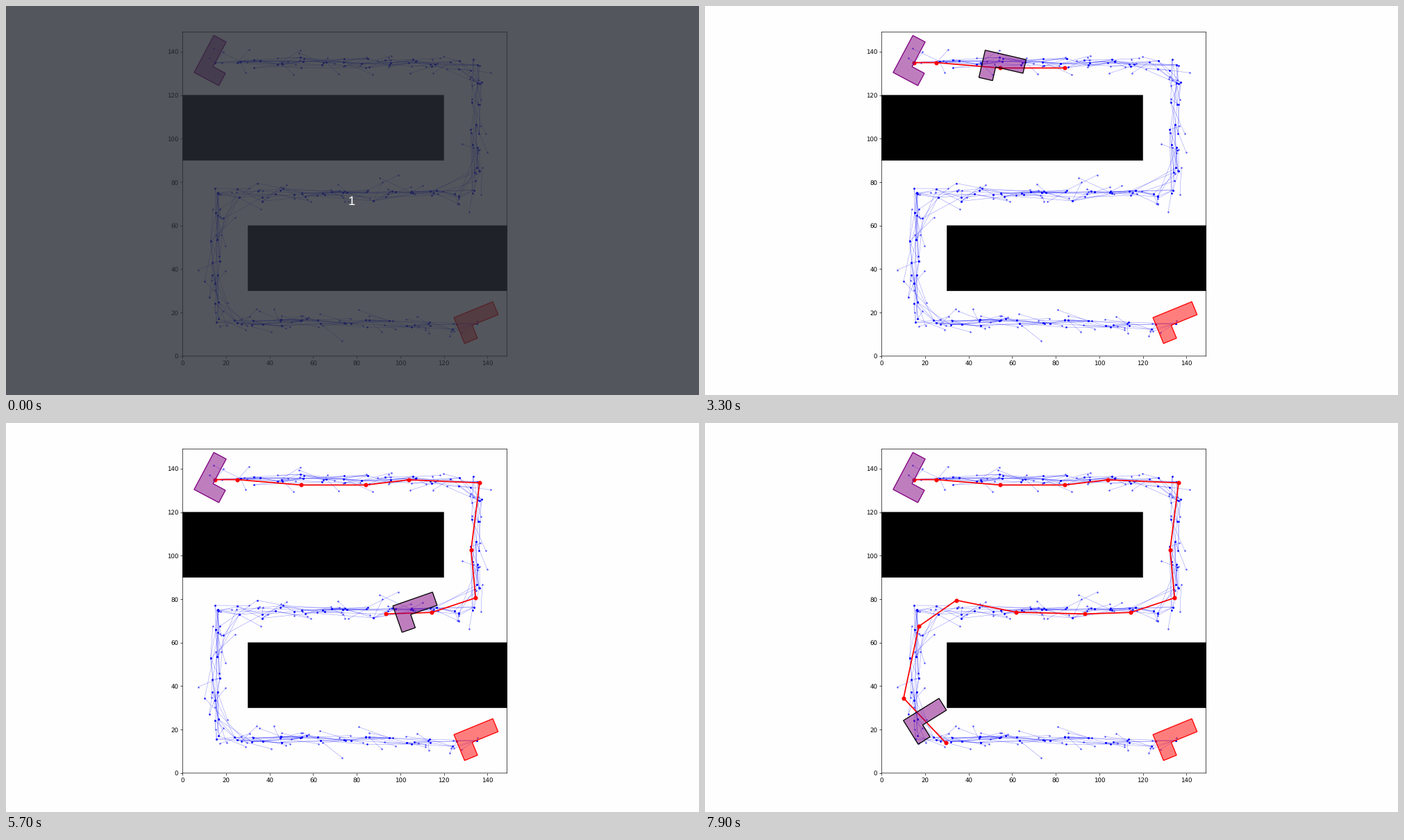
A matplotlib script for the animation above (8 s loop, 998 by 561 pixels).

```python
import math
import random

import matplotlib.pyplot as plt
import numpy as np
from matplotlib.animation import FuncAnimation
from matplotlib.collections import LineCollection
from matplotlib.colors import to_rgba
from matplotlib.patches import Polygon, Rectangle

W, H, DPI = 998, 561, 62.375
INTERVAL, FRAMES = 100, 80
SIZE = 149
START_FRAME = 26      # robot appears
STEP = 7.72           # distance travelled per frame
CELL = 6.43           # side of one cell of the L shape
PAPER = "#fefefe"

plt.rcParams.update({"font.family": "DejaVu Sans", "text.hinting": "none"})

# Planned route: x, y, heading in degrees
ROUTE = [
    (15, 135, 62), (25.1, 135, 46), (54.5, 132.5, -13), (84.1, 132.5, -95),
    (103.9, 134.9, -132.3), (136.4, 133.5, -91), (132.5, 102.6, -45),
    (134.6, 80.6, -31), (114.5, 73.9, 17), (93.4, 73.2, 23),
    (61.7, 74, 31), (34.3, 79.5, 32), (17.1, 67.5, 30), (10.1, 34.5, 6),
    (29.5, 13.9, 53.5),
]
GOAL = (135, 15, 22.3)

# Middle of the free corridor
CORRIDOR = [(15, 135), (135, 135), (135, 75), (15, 75), (15, 15), (135, 15)]


def stations(spacing=10):
    """Evenly spaced points along the corridor."""
    pts = []
    for a, b in zip(CORRIDOR, CORRIDOR[1:]):
        n = round(math.dist(a, b) / spacing)
        pts += [(a[0] + (b[0] - a[0]) * i / n, a[1] + (b[1] - a[1]) * i / n)
                for i in range(n)]
    return pts + [CORRIDOR[-1]]


def build_roadmap():
    """Clusters of nodes along the corridor, linked ahead, with side twigs."""
    rng = random.Random(7)

    def near(p, spread):
        return rng.gauss(p[0], spread), rng.gauss(p[1], spread)

    clusters = [[near(p, 1.4) for _ in range(3)] for p in stations()]
    clusters[0] = [ROUTE[0][:2]]
    clusters[-1] = [GOAL[:2]]

    edges = [(a[:2], b[:2]) for a, b in zip(ROUTE, ROUTE[1:])]
    for i, cluster in enumerate(clusters):
        for node in cluster:
            for ahead, chance in ((1, 0.7), (2, 0.5), (3, 0.25)):
                if i + ahead < len(clusters) and rng.random() < chance:
                    edges.append((node, rng.choice(clusters[i + ahead])))
        for _ in range(3):
            node = rng.choice(cluster)
            j = min(max(i + rng.choice((-1, 0, 1)), 0), len(clusters) - 1)
            edges.append((node, near(rng.choice(clusters[j]), 3)))
    return edges


def l_shape(x, y, deg):
    pts = np.array([(0, 0), (3, 0), (3, -1), (1, -1), (1, -2), (0, -2)], float)
    pts = (pts - pts.mean(axis=0)) * CELL
    c, s = math.cos(math.radians(deg)), math.sin(math.radians(deg))
    return pts @ np.array([(c, s), (-s, c)]) + (x, y)


def build_poses():
    """One (segment, pose) per moving frame."""
    poses = []
    for seg, (a, b) in enumerate(zip(ROUTE, ROUTE[1:])):
        a, b = np.array(a, float), np.array(b, float)
        length = math.dist(a[:2], b[:2])
        for d in np.arange(0, length, STEP):
            poses.append((seg, a + (b - a) * d / length))
    return poses


def add_shape(pose, face, edge):
    patch = Polygon(l_shape(*pose), closed=True, fc=to_rgba(face, 0.5),
                    ec=edge, lw=1.5, zorder=2.4)
    return ax.add_patch(patch)


fig = plt.figure(figsize=(W / DPI, H / DPI), dpi=DPI, facecolor=PAPER)
ax = fig.add_axes([254.3 / W, 56.1 / H, 467.2 / W, 467.2 / H], facecolor=PAPER)
ax.set(xlim=(0, SIZE), ylim=(0, SIZE))
ax.set_xticks(range(0, SIZE, 20))
ax.set_yticks(range(0, SIZE, 20))
for spine in ax.spines.values():
    spine.set_snap(False)

for corner in ((0, 90), (30, 30)):
    ax.add_patch(Rectangle(corner, 120, 30, color="black", lw=0.5, snap=False))

edges = build_roadmap()
ax.add_collection(LineCollection(edges, colors="blue", lw=0.5, alpha=0.5,
                                 zorder=1.9), autolim=False)
ends = np.array(edges).reshape(-1, 2)
ax.plot(ends[:, 0], ends[:, 1], "bo", ms=2, alpha=0.5, zorder=2)

add_shape(ROUTE[0], "purple", "purple")
add_shape(GOAL, "red", "red")
path, = ax.plot([], [], "ro-", lw=2, ms=6, zorder=2.2)
robot = add_shape(ROUTE[0], "purple", "black")

# Dimmed title card with a counter
shade = fig.add_artist(Rectangle((0, 0), 1, 1, transform=fig.transFigure,
                                 fc="#282c34", ec="none", alpha=0.8, zorder=10))
count = fig.text(498 / W, 1 - 282 / H, "1", color="white", fontsize=20.8,
                 family="Liberation Sans", ha="center", va="center", zorder=11)

poses = build_poses()


def update(frame):
    card = frame == 0
    shade.set_visible(card)
    count.set_visible(card)

    moving = frame >= START_FRAME
    robot.set_visible(moving)
    path.set_visible(moving)
    if moving:
        # the robot rests for one frame twice
        i = frame - START_FRAME - (frame >= 30) - (frame >= 75)
        seg, pose = poses[i]
        robot.set_xy(l_shape(*pose))
        done = ROUTE[:seg + 2]
        path.set_data([p[0] for p in done], [p[1] for p in done])
    return shade, count, robot, path


anim = FuncAnimation(fig, update, frames=FRAMES, interval=INTERVAL,
                     repeat=True, repeat_delay=0, blit=False)
plt.show()
```
